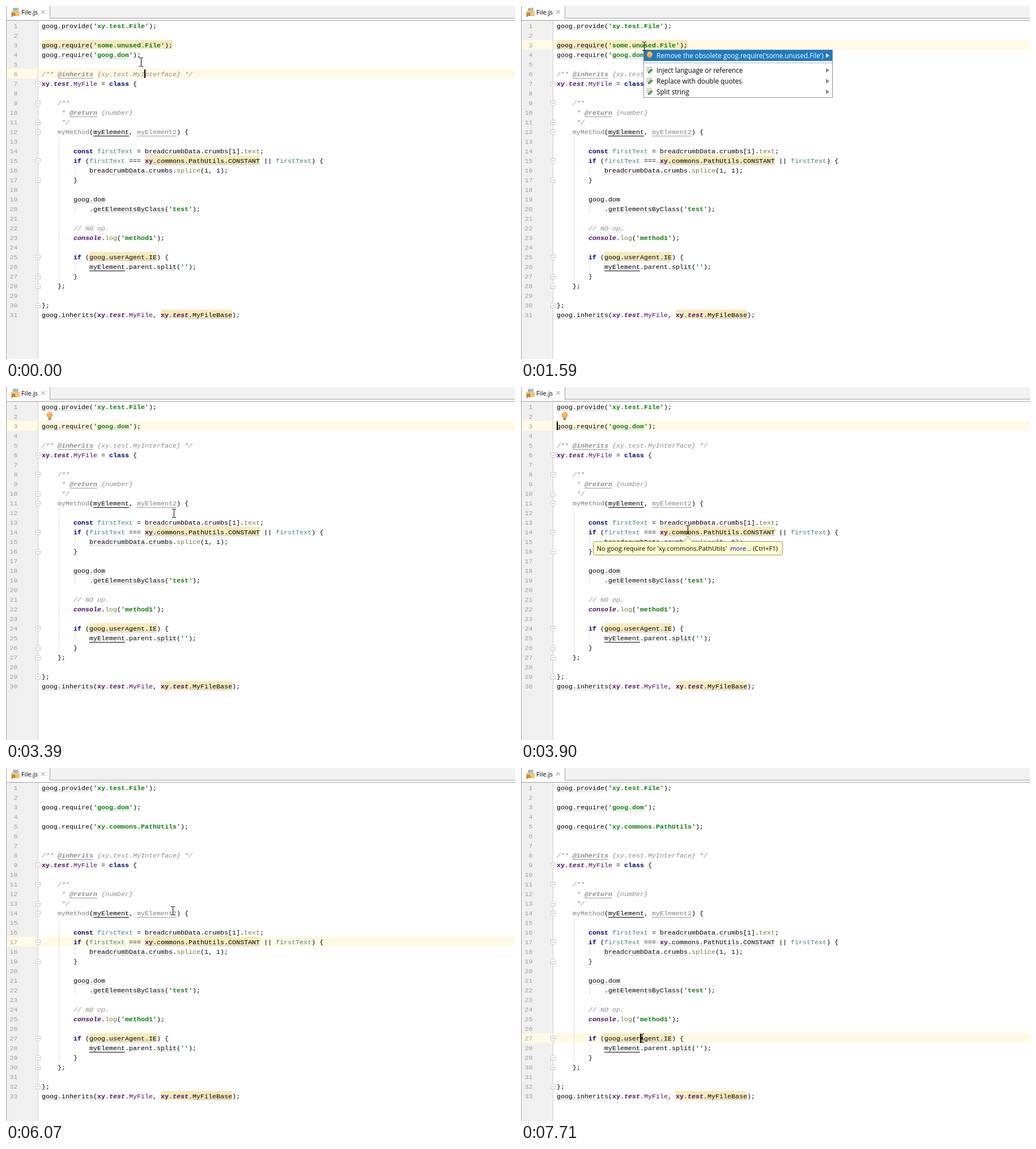
Animation of 898x623 px, one loop 8 s. Source, as an HTML page:

```html
<!DOCTYPE html>
<html lang="en">
<head>
<meta charset="utf-8">
<title>Editor quick fixes</title>
<style>
html, body { margin: 0; width: 100%; height: 100%; overflow: hidden; background: #fff; }
svg { display: block; }
text { white-space: pre; }
.code text { font: 11.667px "Liberation Mono", "Courier New", monospace; fill: #000; }
.code .num { fill: #a0a0a0; text-anchor: end; }
.code .b { font-weight: bold; }
.code .i { font-style: italic; }
.code .k { fill: #000080; font-weight: bold; }
.code .s { fill: #0c7c0c; font-weight: bold; }
.code .c { fill: #8c8c8c; font-style: italic; }
.code .g { fill: #808080; }
.code .l { fill: #458383; }
.code .m { fill: #7a7a43; }
.code .p { fill: #4c0c66; }
.ui { font: 11.35px "Open Sans", "Noto Sans", sans-serif; fill: #000; }
.menu .ui { font-size: 11.7px; }
.crisp { shape-rendering: crispEdges; }
.wave { fill: none; stroke: #b4b4b4; stroke-width: .8; }
</style>
</head>
<body>
<svg id="stage" width="898" height="623" viewBox="0 0 898 623"></svg>
<script>
const LOOP = 8000, LEFT = 63, CHAR = 7, ROW = 17;
const rowTop = n => 26 + ROW * (n - 1);
const rect = (x, y, w, h, fill, more = '') =>
  `<rect x="${x}" y="${y}" width="${w}" height="${h}" fill="${fill}" ${more}/>`;
const path = (d, more) => `<path d="${d}" ${more}/>`;
const escape = s => s.replace(/&/g, '&amp;');
const text = (x, y, s, cls, more = '') =>
  `<text x="${x}" y="${y}" class="${cls}" ${more}>${escape(s)}</text>`;

// <styles text>: h highlight, w wavy line, u underline, others are text classes
const myFile = "<pb xy><p .><pbi test><p .MyFile>";
const first = `<w goog.provide>(<s 'xy.test.File'>);

<hw goog.require><h (><hs 'some.unused.File'><h );>
<w goog.require>(<s '><ws goog.dom><s '>);

<c /** ><cbu @inherits><c  {xy.test.MyInterface} */>
${myFile} = <k class> {

    <c /**>
     <c * ><cbu @return><c  {number}>
     <c */>
    <g myMethod>(<u myElement>, <gu myElement2>) {

        <k const> <l firstText> = <w breadcrumbData>.<w crumbs>[1].<m text>;
        <k if> (<l firstText> === <hwpb xy><hw .commons.PathUtils.CONSTANT> || <l firstText>) {
            <w breadcrumbData>.<w crumbs>.<m splice>(1, 1);
        }

        <w goog.dom>
            .<w getElementsByClass>(<s 'test'>);

        <c // NO op.>
        <pbi console>.<m log>(<s 'method1'>);

        <k if> (<hw goog.userAgent.IE>) {
            <u myElement>.parent.<w split>(<s ''>);
        }
    };

};
<w goog.inherits>(${myFile}, <hpb xy><hp .><hpbi test><hw .MyFileBase>);`.split('\n');

const removed = first.filter((_, i) => i !== 2);
const settled = [...removed];
settled.splice(3, 0, '', "<w goog.require>(<s 'xy.commons.PathUtils'>);", '');
const added = settled.map(s => s.replace('<w goog.require>', 'goog.require'));
settled[16] = settled[16].replace(/<hw/g, '<w');

function wave(x, y, w) {
  let d = `M${x} ${y}`;
  for (let i = 2; i <= w; i += 2) d += `L${x + i} ${y + (i % 4 ? 2 : 0)}`;
  return path(d, 'class="wave"');
}

function codeLine(line, n) {
  const top = rowTop(n), base = top + 13;
  let col = 0, back = '', front = '';
  for (const [, cls = '', styled, plain] of line.matchAll(/<(\w+) ([^>]*)>|([^<]+)/g)) {
    const s = styled ?? plain, x = LEFT + col * CHAR, w = s.length * CHAR;
    if (cls.includes('h')) back += rect(x, top, w, ROW - 1, '#f6ebbc', 'class="crisp"');
    if (cls.includes('w')) back += wave(x, base + 1.5, w);
    if (cls.includes('u'))
      back += rect(x, base + 3, w, 1, /[cg]/.test(cls) ? '#999' : '#000', 'class="crisp"');
    if (s.trim()) front += text(x, base, s, [...cls].join(' '));
    col += s.length;
  }
  return back + front + text(20.5, base, String(n), 'num');
}

function foldMark(line, n) {
  const bare = line.replace(/<\w+ |>/g, '').trim();
  const opens = bare === '/**' || bare.endsWith('{');
  const closes = bare === '*/' || bare.startsWith('}');
  if (!opens && !closes) return '';
  const flip = opens ? 1 : -1;
  return `<g transform="translate(56.5 ${rowTop(n) + 9.5}) scale(1 ${flip})">` +
    path('M-4-4H4V2L1.5 4.5H-1.5L-4 2Z', 'fill="#fff" stroke="#c4c4c4"') +
    path('M-2 0H2', 'stroke="#aaa"') + '</g>';
}

function codePage(lines) {
  const start = lines.findIndex(s => s.includes('myMethod')) + 2;
  const guide = (x, n, rows) => rect(x, rowTop(n), 1, rows * ROW, '#dedede', 'class="crisp"');
  let out = guide(93, start, 15);
  lines.forEach((s, i) => {
    if (/^ {12}\S/.test(s)) out += guide(121, i + 1, 1);
    out += codeLine(s, i + 1) + foldMark(s, i + 1);
  });
  return `<g class="code page">${out}</g>`;
}

const bulb = (x, y) => `<g transform="translate(${x} ${y})">` +
  path('M-2.5 3C-3 1.5-5 .5-5-2.2A5 4.8 0 0 1 5-2.2C5 .5 3 1.5 2.5 3Z',
    'fill="#f5b04c" stroke="#d9923a" stroke-width=".7"') +
  path('M-2.5-4Q-1-5.5 1-5', 'fill="none" stroke="#ffe2ac" stroke-width="1.4"') +
  path('M-2.5 4H2.5M-2.5 6H2.5', 'stroke="#777" stroke-width="1.4"') + '</g>';

const pencil = (x, y) => `<g transform="translate(${x} ${y})">` +
  path('M-6-5H4M-6-2H3M-6 1H0', 'stroke="#9a9a9a"') +
  path('M-3 5L-2 2L3-3L5.5-.5L.5 4.5Z', 'fill="#4aa64a" stroke="#2f7f38" stroke-width=".6"') +
  path('M-3 5L-2.4 3L-1 4.5Z', 'fill="#444"') + '</g>';

function tooltip(x, y, w, tip, message) {
  const r = x + w, b = y + 24;
  const d = `M${x + 3} ${y}H${tip - 7}L${tip} ${y - 9}L${tip + 7} ${y}H${r - 3}q3 0 3 3` +
    `V${b - 3}q0 3-3 3H${x + 3}q-3 0-3-3V${y + 3}q0-3 3-3Z`;
  const base = y + 16.5;
  return '<g class="tip">' + path(d, 'fill="#ffffcd" stroke="#91917c"') +
    text(x + 6, base, message, 'ui') +
    text(r - 92.5, base, 'more...', 'ui', 'style="fill:#00c"') +
    text(r - 52.5, base, '(Ctrl+F1)', 'ui') + '</g>';
}

function menu(x, y, w, fixes, intentions) {
  const all = [...fixes, ...intentions], h = all.length * 19 + 7;
  let out = rect(x + .5, y - .5, w, h + 1, '#fff', 'stroke="#8c8c8c"');
  out += rect(x + 1, y, w - 1, 19, '#1c7ac5');
  out += rect(x + 1, y + fixes.length * 19 + 3, w - 1, 1, '#b0b0b0');
  all.forEach((label, i) => {
    const isFix = i < fixes.length, mid = y + i * 19 + (isFix ? 0 : 7) + 9.5;
    const ink = i ? '#000' : '#fff';
    out += (isFix ? bulb : pencil)(x + 11, mid);
    out += text(x + 23, mid + 4.5, label, 'ui', `style="fill:${ink}"`);
    out += path(`M${x + w - 11} ${mid - 4}l6 4l-6 4Z`, `fill="${i ? '#888' : '#fff'}"`);
  });
  return `<g class="menu">${out}</g>`;
}

const tab = rect(0, 0, 898, 26, '#fff') +
  rect(78, 0, 820, 21, '#f2f2f2') +
  '<g class="crisp">' + rect(77, 0, 1, 22, '#a0a0a0') + rect(77, 21, 821, 1, '#a0a0a0') +
  rect(0, 25, 898, 1, '#a0a0a0') + rect(0, 0, 1, 623, '#a0a0a0') + '</g>' +
  path('M15 3H22V11H12V6Z', 'fill="#a9bfca"') + path('M12 6L15 3V6Z', 'fill="#6f8a99"') +
  rect(9, 9, 15, 9, '#f3c566') +
  text(10, 17, 'JS', 'ui', 'style="font-size:7.5px;font-weight:bold;fill:#8a3c14"') +
  text(27, 15, 'File.js', 'ui') +
  path('M62.5 7.5l6 6m0-6l-6 6', 'stroke="#aaa" stroke-width="1.2"');

document.getElementById('stage').innerHTML =
  rect(0, 0, 898, 623, '#fff') + rect(0, 26, 56, 597, '#f0f0f0') +
  rect(0, 0, 898, ROW, '#fffae3', 'id="row" class="crisp"') +
  rect(56, 26, 1, 597, '#d0d0d0', 'class="crisp"') + tab +
  [first, removed, added, settled].map(codePage).join('') +
  `<g id="bulb">${bulb(77, 0)}</g>` +
  rect(0, 1, 2, 15, '#000', 'id="caret" class="crisp"') +
  tooltip(74.5, 85.5, 286, 217.5, 'Obsolete require: some.unused.File') +
  tooltip(127.5, 272.5, 334, 294.5, "No goog.require for 'xy.commons.PathUtils'") +
  menu(216, 78, 333, ["Remove the obsolete goog.require('some.unused.File')"],
    ['Inject language or reference', 'Replace with double quotes', 'Split string']) +
  menu(293, 264, 266,
    ["Add goog.require('xy.commons.PathUtils')", "Create Field 'commons'", 'Rename reference'],
    ['Flip ===', 'Flip if-else', 'Flip ||', 'Negate === to !==', 'Replace || with &&', 'Split OR-ed if']) +
  path('M-3-7.5H-1Q0-7.5 .5-6.5Q1-7.5 2-7.5H4M.5-7V7M-3 7.5H-1Q0 7.5 .5 6.5Q1 7.5 2 7.5H4',
    'id="mouse" fill="none" stroke="#000"');

// Step tables: [start, value...]
const PAGE = [[0, 0], [2180, 1], [6070, 2], [6400, 3]];
const ACTIVE = [[0, 6], [1210, 3], [4820, 14], [6070, 17], [7660, 27]];
const BULB = [[0, 0], [740, 5], [1210, 0], [2950, 2], [4820, 0], [6680, 16], [7660, 0]];
const TIP = [[0, 0], [420, 1], [1210, 0], [3900, 2], [4820, 0]];
const MENU = [[0, 0], [1590, 1], [2180, 0], [5220, 2], [6070, 0]];
const CARET = [[0, 244], [1110, 0], [1210, 216], [1590, 0], [2180, 63], [3170, 0], [3670, 63],
  [4180, 0], [4690, 63], [4820, 294], [5220, 0], [6400, 294], [6900, 0], [7660, 210]];
const MOUSE = [[0, 238, 99], [50, 238, 99], [370, 217, 71], [2740, 217, 71], [3500, 309, 249],
  [3550, 465, 272], [3600, 400, 264], [3670, 294, 252], [6680, 294, 252], [6970, 235, 375],
  [7110, 235, 375], [7400, 206, 510], [7660, 213, 477], [LOOP, 213, 477]];

const stepAt = (table, t) => table.findLast(k => k[0] <= t)[1];
function pointAt(table, t) {
  const i = table.findIndex(k => k[0] > t), a = table[i - 1], b = table[i];
  const f = (t - a[0]) / (b[0] - a[0]);
  return [1, 2].map(j => Math.round(a[j] + (b[j] - a[j]) * f));
}

const $ = id => document.getElementById(id);
const groups = name => [...document.querySelectorAll(name)];
const pages = groups('.page'), tips = groups('.tip'), menus = groups('.menu');
const show = (el, on) => el.setAttribute('visibility', on ? 'visible' : 'hidden');
const move = (el, x, y) => el.setAttribute('transform', `translate(${x} ${y})`);

function draw() {
  const t = performance.now() % LOOP;
  const line = stepAt(ACTIVE, t), bulbLine = stepAt(BULB, t), caretX = stepAt(CARET, t);
  pages.forEach((el, i) => show(el, i === stepAt(PAGE, t)));
  tips.forEach((el, i) => show(el, i + 1 === stepAt(TIP, t)));
  menus.forEach((el, i) => show(el, i + 1 === stepAt(MENU, t)));
  move($('row'), 0, rowTop(line));
  show($('caret'), caretX);
  move($('caret'), caretX, rowTop(line));
  show($('bulb'), bulbLine);
  move($('bulb'), 0, rowTop(bulbLine) + 8.5);
  move($('mouse'), ...pointAt(MOUSE, t));
  requestAnimationFrame(draw);
}
draw();
</script>
</body>
</html>
```
